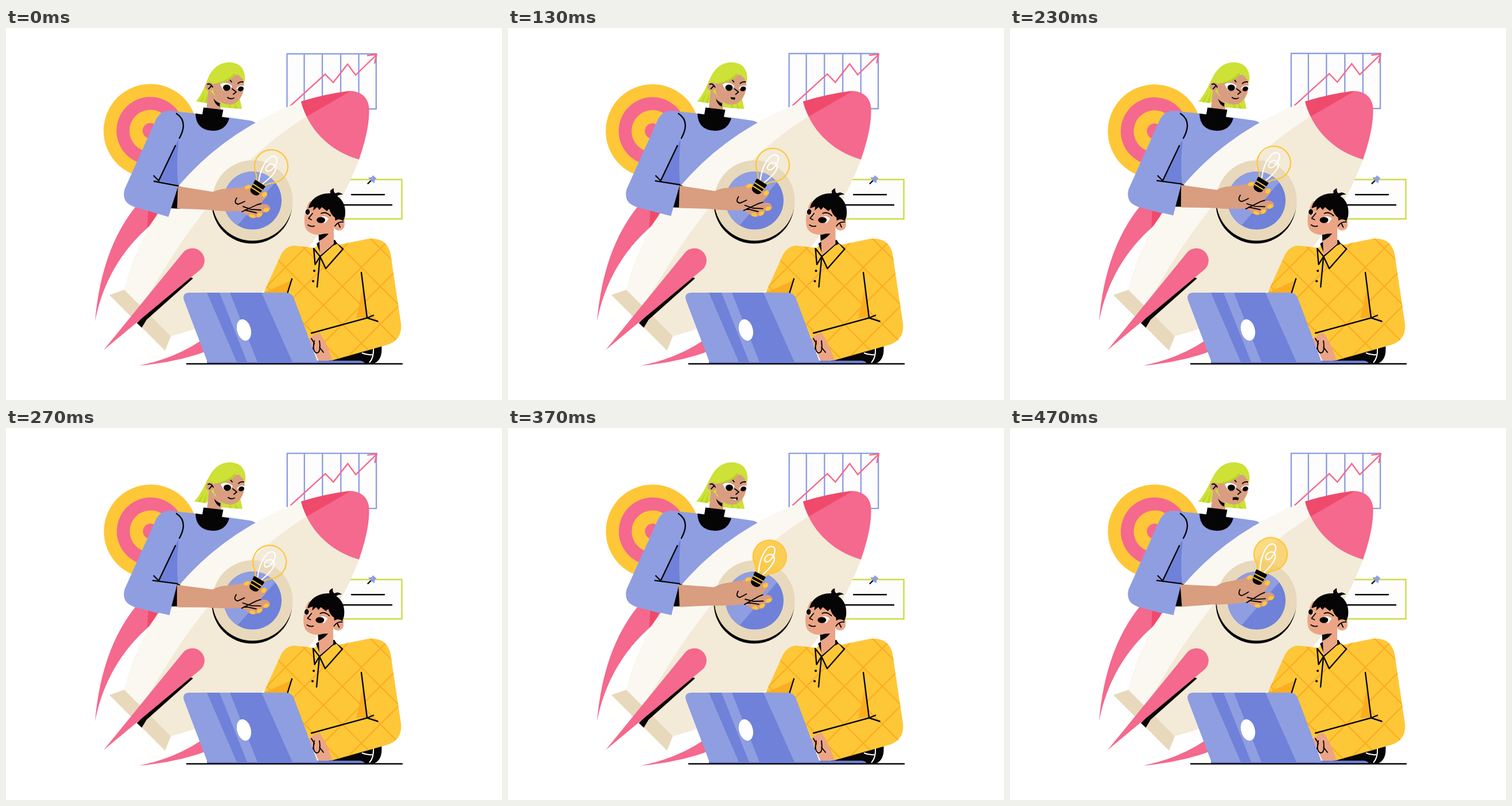
An HTML page for the animation above (500 ms loop, 864x648 px).

```html
<!DOCTYPE html>
<html lang="en">
<head>
<meta charset="utf-8">
<title>Rocket team</title>
<style>
  html, body { margin: 0; width: 100%; height: 100%; overflow: hidden; background: #fff; }
  svg { display: block; width: 100vw; height: 100vh; }
  .blue { fill: #8f9ee1; } .navy { fill: #6f81d9; }
  .gold { fill: #fec738; } .amber { fill: #fbae22; }
  .pink { fill: #f4698d; } .red { fill: #ef4a6b; }
  .cream { fill: #f3ead8; } .pale { fill: #fbf8f2; } .sand { fill: #e8d9bc; }
  .tan { fill: #d99d80; } .peach { fill: #eba586; }
  .lime { fill: #cde137; } .leaf { fill: #b9d321; }
  .ink { fill: #050505; } .white { fill: #fff; }
  .line { fill: none; stroke: #050505; stroke-width: 2.4; stroke-linecap: round; stroke-linejoin: round; }
  .thin { stroke-width: 1.9; }
</style>
</head>
<body>
<svg viewBox="0 0 864 648" xmlns="http://www.w3.org/2000/svg">
  <defs>
    <pattern id="plaid" x="487" y="417" width="66" height="66" patternUnits="userSpaceOnUse">
      <path d="M-9 -9L75 75M75 -9L-9 75M57 -9l18 18M-9 57l18 18M-9 9L9 -9M57 75L75 57" stroke="#fbae22" stroke-width="2.4"/>
    </pattern>
    <path id="jumper" d="M449 461L478 397Q486 380 502 379L537 383L546 376L578 378L632 367Q664 365 670 394L688 515Q691 543 664 552L568 579L550 545L528 540L495 480L460 470Z"/>
    <path id="fin" d="M226 311Q166 385 155 511Q175 410 250 345L268 318Z"/>
    <clipPath id="pane"><circle cx="429.5" cy="300.5" r="50.5"/></clipPath>
    <clipPath id="lid"><path d="M320 461H488Q498 461 502 472L543 582H351L310 474Q306 461 320 461Z"/></clipPath>
  </defs>

  <g id="target">
    <circle class="gold" cx="251.500" cy="179" r="81.500"/>
    <circle class="pink" cx="251.500" cy="179" r="59"/>
    <circle class="gold" cx="251.500" cy="179" r="36.500"/>
    <circle class="pink" cx="251.500" cy="179" r="13.500"/>
  </g>

  <g id="chart" fill="none" stroke-width="2.4">
    <path d="M489.500 45H644.800V141H489.500ZM519.500 45V141M551 45V141M583 45V141M614.500 45V141" stroke="#8f9ee1" fill="#fdfdfd" stroke-linejoin="round"/>
    <path d="M495 136L556 80.500L570 95L595 63L609 82L645 47M629 48L645.500 46L642 62" stroke="#f4698d"/>
  </g>

  <g id="note">
    <rect x="560" y="264" width="129.500" height="68.500" fill="#fdfdfd" stroke="#cbdc40" stroke-width="2.400"/>
    <path class="line" d="M602 290.300H659M580 308.300H672M630.500 271L636 265.500"/>
    <path class="blue" d="M631 260.500L637 260L639 256.500L645.500 262L642.500 264.500L641.500 270.500L636.500 267Z"/>
  </g>

  <!-- rear fins, mirrored across the rocket's axis -->
  <use href="#fin" class="pink"/>
  <use href="#fin" class="pink" transform="matrix(0 -1 -1 0 743 743)"/>
  <path class="red" d="M248 315H268L260 330L246 348Z"/>

  <!-- woman, torso and head -->
  <path class="blue" d="M285 144L330 149L389 156L424 161Q434 162 439 170L380 230L290 300L262 260Z"/>
  <path class="navy" d="M301 193L295 205L267 266L300 273Q296 240 301 193Z"/>
  <g id="head">
    <g id="lock">
      <path class="lime" d="M360 74C346 95 347 108 331 128L351 131L366 118V80Z"/>
      <path class="leaf" d="M347 112L338 128L341 129.500ZM352 112L346 130L350 130.500Z"/>
    </g>
    <path class="lime" d="M372 125L374 138L396 140L411 141L406 117Z"/>
    <path class="leaf" d="M397 130L399 140L403 140.500ZM389 132L388 139L392 139.500Z"/>
    <path class="tan" d="M353 106L349 142L374 145L374 130Z"/>
    <path class="tan" d="M361 88L408 80C417 90 416 106 411 117C405 130 395 135 385 133C373 131 364 122 361 110Z"/>
    <circle class="tan" cx="354.500" cy="102" r="7.500"/>
    <path class="ink" d="M361.500 123Q364 134 372 137L372.500 131Q366 129 361.500 123Z"/>
    <path class="lime" d="M359 75C372 57 396 56 408 66C415 73 418 84 415.500 95C411 86 405 81 400 80C390 93 376 95 362 97Q357 91 350 95Q352 83 359 75Z"/>
    <path class="leaf" d="M362 97Q386 92 397 79L401 80C392 92 379 96 362 97Z"/>
    <path class="white" d="M373 98Q383 92 394 101L389 109L379 109ZM401 106Q405 98 416 101L413 108Z"/>
    <ellipse class="ink" cx="384.500" cy="104" rx="6.500" ry="5.500"/>
    <ellipse class="ink" cx="409" cy="106" rx="5.200" ry="4" transform="rotate(-25 409 106)"/>
    <path class="line thin" d="M390.500 91L393 94M404 96.500Q408 93 413 94M394 106L401 111.500L396 115.500M351 98Q356 96 360 103M353 106L357.500 101"/>
    <g id="mouth">
      <path class="line thin" d="M386 121Q391 125 397 122"/>
      <path class="ink" d="M387 120.500L395.500 121L394.500 125L388.500 124Z"/>
      <path class="line thin" d="M387 122L397 122.500M397.500 120.500V124"/>
      <g><path class="line thin" d="M387 121.500L397 122.500M398 121V125"/><path class="white" d="M390 123L396 123.500L395 125.500Z"/></g>
      <path class="ink" d="M387 121Q393 119 398 122L396 126Q390 124 387 126Z"/>
    </g>
  </g>
  <path class="ink" d="M344 138.500L378.500 142.500L376 155L389 157Q383 179 360 179Q331 178 330 149L342 150.500Z"/>

  <!-- rocket -->
  <path class="cream" d="M206 457C232 350 318 203 514 128L615 229C540 425 393 511 286 537Z"/>
  <path class="pale" d="M206 457C222 400 245 350 268 320Q352 190 514 128L524 154Q368 248 236 487Z"/>
  <path class="pink" d="M514 128C526 175 562 214 615 229C628 190 633 165 632.500 140C631 118 614 108 594 110Q556 115 514 128Z"/>
  <path class="red" d="M514 128Q556 115 600 110L524 154Q517 141 514 128Z"/>
  <circle class="ink" cx="428.500" cy="305.500" r="70"/>
  <circle class="sand" cx="429.500" cy="300.500" r="70"/>
  <g clip-path="url(#pane)">
    <path class="navy" d="M370 240H490V360H370Z"/>
    <path class="blue" d="M370 240H494L404 343L370 360Z"/>
  </g>
  <path class="sand" d="M180 465L206 456L287 537L277 562Z"/>
  <path class="ink" d="M228 514L236.500 522L245 508L326 436L310 430Z"/>
  <path class="pink" d="M170 561L307 393A21.300 21.300 0 1 1 336 423Z"/>

  <!-- woman, arm and bulb -->
  <path class="blue" d="M285 144Q268 144 260 162L206.500 281Q201 304 222 311L266 323L294 274L270 266L296 205Q314 175 298 146Z"/>
  <path class="navy" d="M300 195L295 205L267 266L285 269Q296 240 300 195Z"/>
  <g id="cuff">
    <path class="blue" d="M224 300L222 311L283 329L300 275L262 267Z"/>
    <path class="ink" d="M300 275L287.500 314L303 315L305 277Z"/>
    <path class="line" d="M258 267L300 275"/>
  </g>
  <path class="line" d="M297 149Q318 163 302 192M295 205L266 266L257.500 257.500"/>
  <g id="arm">
    <path class="tan" d="M299.500 275.500L361 285.500Q372 280 385 280L414 277Q423 270 428 275L430 290L447 285L452 296L441 308Q457 303 460.500 314Q459 322 448 321Q447 330 436 330Q429 334 420 326L410 319Q390 321 350 316.500L298 314.500Z"/>
    <ellipse class="gold" cx="421" cy="277" rx="5.500" ry="3.300" transform="rotate(-20 421 277)"/>
    <g transform="translate(462 241) rotate(33)">
      <path id="glow" class="gold" d="M-9 35C-10 27 -18 24 -22 19A29 29 0 1 1 22 19C18 24 10 27 9 35Z" stroke="#fec738" stroke-width="2.200"/>
      <path d="M-4 34C-16 8 -14 -17 -3 -18C8 -18 7 10 -2 11C-9 11 -7 -5 3 -5C14 -3 11 14 4 34" fill="none" stroke="#fff" stroke-width="2.200"/>
      <path class="ink" d="M-10 34.500H10Q11 35 10.500 38L8.500 54Q6 58 0 58Q-6 58 -8.500 54L-10.500 38Q-11 35 -10 34.500Z"/>
      <path d="M-10 43H10M-9 49.500H9" stroke="#fec738" stroke-width="2"/>
    </g>
    <path class="tan" d="M418 307L426 297Q438 294 444 288Q452 282 455.500 288Q455 295 446 301L436 310Z"/>
    <g class="gold">
      <ellipse cx="450.500" cy="290" rx="5" ry="3.800" transform="rotate(-35 450.5 290)"/>
      <ellipse cx="453.500" cy="317" rx="5.200" ry="3.500" transform="rotate(-15 453.5 317)"/>
      <ellipse cx="441.500" cy="325.500" rx="4.800" ry="3.300" transform="rotate(-35 441.5 325.5)"/>
      <ellipse cx="429" cy="327.500" rx="5.200" ry="3" transform="rotate(18 429 327.5)"/>
    </g>
    <path class="line thin" d="M402 296Q396 305 404 307Q410 305 416 302M411 320L437 308L444 306M413 311L427 316L444 317M416 317L436 322"/>
  </g>

  <!-- man -->
  <path class="ink" d="M555 584L568 576L654 551Q657 577 642 584Z"/>
  <path d="M620 566Q629 570 638 569M640 558Q641 574 633 583" fill="none" stroke="#fff" stroke-width="2"/>
  <use href="#jumper" class="gold"/>
  <use href="#jumper" fill="url(#plaid)"/>
  <path class="amber" d="M622 450L610 505L629 504ZM449 461L496 440L489 466Z"/>
  <path class="line" d="M498 437L489 466M619 426L629 505L640 500.500M532 531.500L629 505L647.500 511"/>
  <path class="peach" d="M527 541L545 530Q555 540 569 579L545 581Z"/>
  <path class="line thin" d="M532 541L537 549L534 561M537 545Q533 563 541 566Q549 566 546 545M546 556L553 565"/>
  <g id="collar">
    <path class="ink" d="M541 376L546 372L573 369L578 377L550 399Z"/>
    <path class="peach" d="M545 352L571 340V376L547 397Z"/>
    <path class="ink" d="M544.500 359L562 358Q556 366 545 371Z"/>
    <path class="line" style="fill:#fec738" d="M536 384L538.500 412L547 398L557 419L587 385L577 376.500L547 398Z"/>
    <path class="gold" d="M570 379L577 376L584 384L558 414L549 398Z"/>
    <path class="line" d="M547 398L542 451"/>
    <circle class="ink" cx="537" cy="423" r="2.100"/>
    <circle class="ink" cx="535" cy="441" r="2.100"/>
  </g>
  <g id="face">
    <path class="peach" d="M529 302C519 317 517 343 524 352C535 364 555 362 568 350L590 340L588 305Z"/>
    <path class="ink" d="M527 314C529 299 545 287 565 288Q563 282 571 279Q570 286 574 288Q580 284 587 290Q579 290 577 293C587 299 593 312 590.500 328L586 340H574L573 330Q566 326 563 315L559 319L550 312L546 317L542 312L535 318L536 311Z"/>
    <circle class="peach" cx="580" cy="343" r="9.800"/>
    <path class="white" d="M522 314L531 321L528 326L522 325ZM541 334Q553 323 562 332L556 340Z"/>
    <ellipse class="ink" cx="525.500" cy="320.500" rx="3.800" ry="5"/>
    <ellipse class="ink" cx="548.500" cy="334.500" rx="7.500" ry="5.200"/>
    <path class="line thin" d="M549 323Q557 319 565 327M534 323L527 331.500L532 334M526 343Q531 347 537 345M573 345Q578 337 587 338M579 341L582 347"/>
  </g>

  <!-- laptop -->
  <path class="navy" d="M350 579.500H616Q624 580 625 585H350Z"/>
  <g clip-path="url(#lid)">
    <path class="blue" d="M300 455H550V590H300Z"/>
    <path class="navy" d="M350 461H372L420 582H402ZM390 461H445L499 582H438Z"/>
  </g>
  <ellipse class="white" cx="414.500" cy="526" rx="12" ry="19" transform="rotate(-15 414.5 526)"/>
  <path class="line" d="M315 585H690"/>
</svg>
<script>
const LOOP = 500, STEPS = 15;
const $ = id => document.getElementById(id);
const move = (id, value) => $(id).setAttribute('transform', value);

// Linear interpolation through [step, value] pairs, held at the ends.
function track(points, k) {
  for (let i = 1; i < points.length; i++) {
    const [a, u] = points[i - 1], [b, v] = points[i];
    if (k <= b) return u + (v - u) * (k - a) / (b - a);
  }
  return points[points.length - 1][1];
}

const drift = [[0, 0], [2, .3], [5, .6], [8, 1]];
const lift = [[0, 0], [2, .1], [5, .7], [8, 1.9], [10, 4.2], [11, 5], [14, 6.5]];
const light = [[0, 0], [8, 0], [10, 1], [11, .82], [14, .58]];
const mouths = '001111100223344';

function pose(k) {
  const s = track(drift, k);
  move('target', `translate(${.5 * s} ${s})`);
  move('chart', `translate(${.3 * s} ${-.9 * s})`);
  move('head', `translate(${s} 0)`);
  move('lock', `translate(360 75) skewX(${-4.4 * s}) translate(-360 -75)`);
  move('cuff', `rotate(${-3.5 * s} 235 300)`);
  move('arm', `translate(${-s} ${-2 * s}) rotate(${-track(lift, k)} 290 292)`);
  move('face', `translate(${-1.7 * s} 0)`);
  move('collar', `translate(${-s} 0)`);
  $('glow').setAttribute('fill-opacity', track(light, k));
  [...$('mouth').children].forEach((m, i) => {
    m.style.display = i === +mouths[k] ? '' : 'none';
  });
}

function tick() {
  const t = performance.now() % LOOP;
  // Steps last 30 or 40 ms, so start each a little early.
  pose(Math.min(STEPS - 1, Math.floor((t + 3.4) * STEPS / LOOP)));
  requestAnimationFrame(tick);
}
tick();
</script>
</body>
</html>
```
